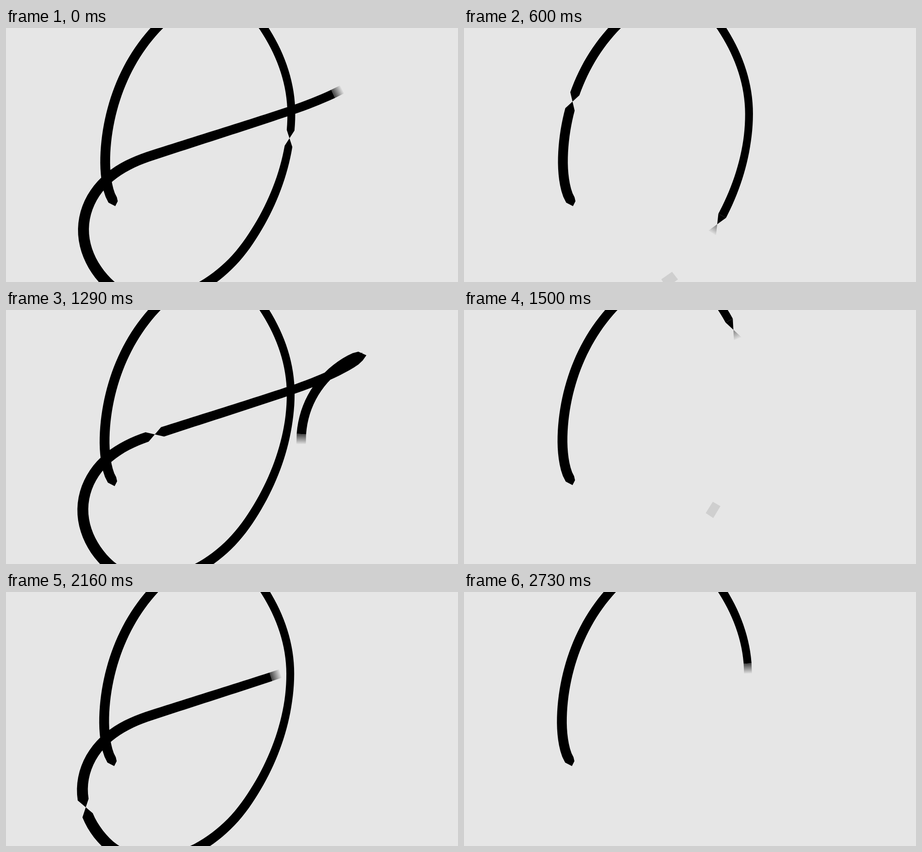
An HTML page with a canvas for the animation above (2.76 s loop, 998x561 px).

```html
<!DOCTYPE html>
<html lang="en">
<head>
<meta charset="utf-8">
<title>Brush stroke</title>
<style>
  html, body { margin: 0; width: 100%; height: 100%; overflow: hidden; background: #e6e6e6; }
  canvas { display: block; width: 998px; height: 561px; }
</style>
</head>
<body>
<canvas id="stage" width="998" height="561"></canvas>
<script>
const LOOP = 2760, FRAME = 30;
const SPEED = 2.22;                          // px per ms along the stroke
const STARTS = [-1075, 69, 1150, 2325];      // when each pass sets off
const TAKEOVER = 345;                        // age at which a pass replaces the previous one
const WIDTHS = [22, 21, 18.5, 17, 21, 25, 22, 19.5, 20, 22, 22];  // evenly spaced along the stroke

const ctx = document.getElementById('stage').getContext('2d');

const spine = document.createElementNS('http://www.w3.org/2000/svg', 'path');
const toTip = `M244 388
  C229 381 219 340 219 295
  C219 218 243 95 333 0
  C400 -71 510 -90 569 0
  C602 50 630 115 630 190
  C630 275 602 370 546 457
  C520 498 490 532 447 561
  C374 610 281 620 222 561
  C190 529 171 487 171 446
  C171 400 194 358 228 330
  C252 310 280 296 312 285
  C390 259 520 219 630 182
  C690 162 765 130 793 101`;
const fromTip = `
  C745 112 653 175 653 295
  C653 370 696 420 772 461
  C860 505 940 525 1040 535`;
spine.setAttribute('d', toTip);
const tip = spine.getTotalLength();
spine.setAttribute('d', toTip + fromTip);
const total = spine.getTotalLength();

const clamp = (v, lo, hi) => Math.min(hi, Math.max(lo, v));

function random(n) {
  const v = Math.sin(n * 127.1 + 31.7) * 43758.5453;
  return v - Math.floor(v);
}

function smooth(from, to, t) {
  const u = clamp((t - from) / (to - from), 0, 1);
  return u * u * (3 - 2 * u);
}

function widthAt(s) {
  const at = s / total * (WIDTHS.length - 1);
  const i = Math.min(Math.floor(at), WIDTHS.length - 2);
  const base = WIDTHS[i] + (WIDTHS[i + 1] - WIDTHS[i]) * (at - i);
  const cap = Math.min(1, 0.55 + s / 25);
  const fold = 1 - 0.45 * Math.exp(-(((s - tip) / 12) ** 2));
  return base * cap * fold;
}

// Both edge points of the ribbon at length s
const cache = new Map();
function section(s) {
  s = clamp(s, 0, total);
  if (!cache.has(s)) {
    const { x, y } = spine.getPointAtLength(s);
    const a = spine.getPointAtLength(Math.max(0, s - 1));
    const b = spine.getPointAtLength(Math.min(total, s + 1));
    const k = widthAt(s) / 2 / (Math.hypot(b.x - a.x, b.y - a.y) || 1);
    const nx = (a.y - b.y) * k, ny = (b.x - a.x) * k;
    cache.set(s, { x, y, l: [x + nx, y + ny], r: [x - nx, y - ny] });
  }
  return cache.get(s);
}

// One piece of ribbon; a twisted one crosses over itself
function quad(from, to, twisted) {
  const a = section(from), b = section(to);
  ctx.moveTo(...a.l);
  ctx.lineTo(...(twisted ? b.r : b.l));
  ctx.lineTo(...(twisted ? b.l : b.r));
  ctx.lineTo(...a.r);
  ctx.closePath();
}

function drawBody(end, notch) {
  ctx.fillStyle = '#000';
  ctx.beginPath();
  for (let s = 0; s < end;) {
    const twisted = s <= notch && notch < s + 12;
    const next = Math.min(end, s + (twisted ? 36 : 12));
    quad(s, next, twisted);
    s = next;
  }
  ctx.fill();
}

function drawHead(from, to, twisted) {
  const a = section(from), b = section(to);
  const fade = ctx.createLinearGradient(a.x, a.y, b.x, b.y);
  fade.addColorStop(0, twisted ? '#000' : 'rgba(0,0,0,0.7)');
  if (twisted) {
    fade.addColorStop(0.5, '#000');
    fade.addColorStop(0.51, 'rgba(0,0,0,0.45)');
  }
  fade.addColorStop(1, 'rgba(0,0,0,0.03)');
  ctx.fillStyle = fade;
  ctx.beginPath();
  quad(from, to, twisted);
  ctx.fill();
}

function drawGhost(s) {
  ctx.fillStyle = 'rgba(0,0,0,0.1)';
  ctx.beginPath();
  quad(s, s + 30, false);
  ctx.fill();
}

function draw(now) {
  const n = Math.floor((now % LOOP) / FRAME), t = n * FRAME;
  const start = STARTS.filter(at => t - at >= TAKEOVER).pop();
  const head = Math.min(total, (t - start) * SPEED);
  const twisted = n % 6 === 2 || n % 6 === 3;
  const neck = head - (twisted ? 44 : 22);
  const notch = random(n) < 0.5 ? random(n + 200) * neck : -1;

  ctx.setTransform(1, 0, 0, 1, 0, 0);
  ctx.fillStyle = '#e6e6e6';
  ctx.fillRect(0, 0, 998, 561);
  ctx.translate(-3 * t / LOOP, -9 * smooth(700, 1900, t));
  drawBody(neck, notch);
  drawHead(neck, head, twisted);
  if (n % 15 === 5) drawGhost(head + 40 + random(n + 400) * 500);
}

const began = performance.now();
function tick() {
  draw(performance.now() - began);
  requestAnimationFrame(tick);
}
tick();
</script>
</body>
</html>
```
